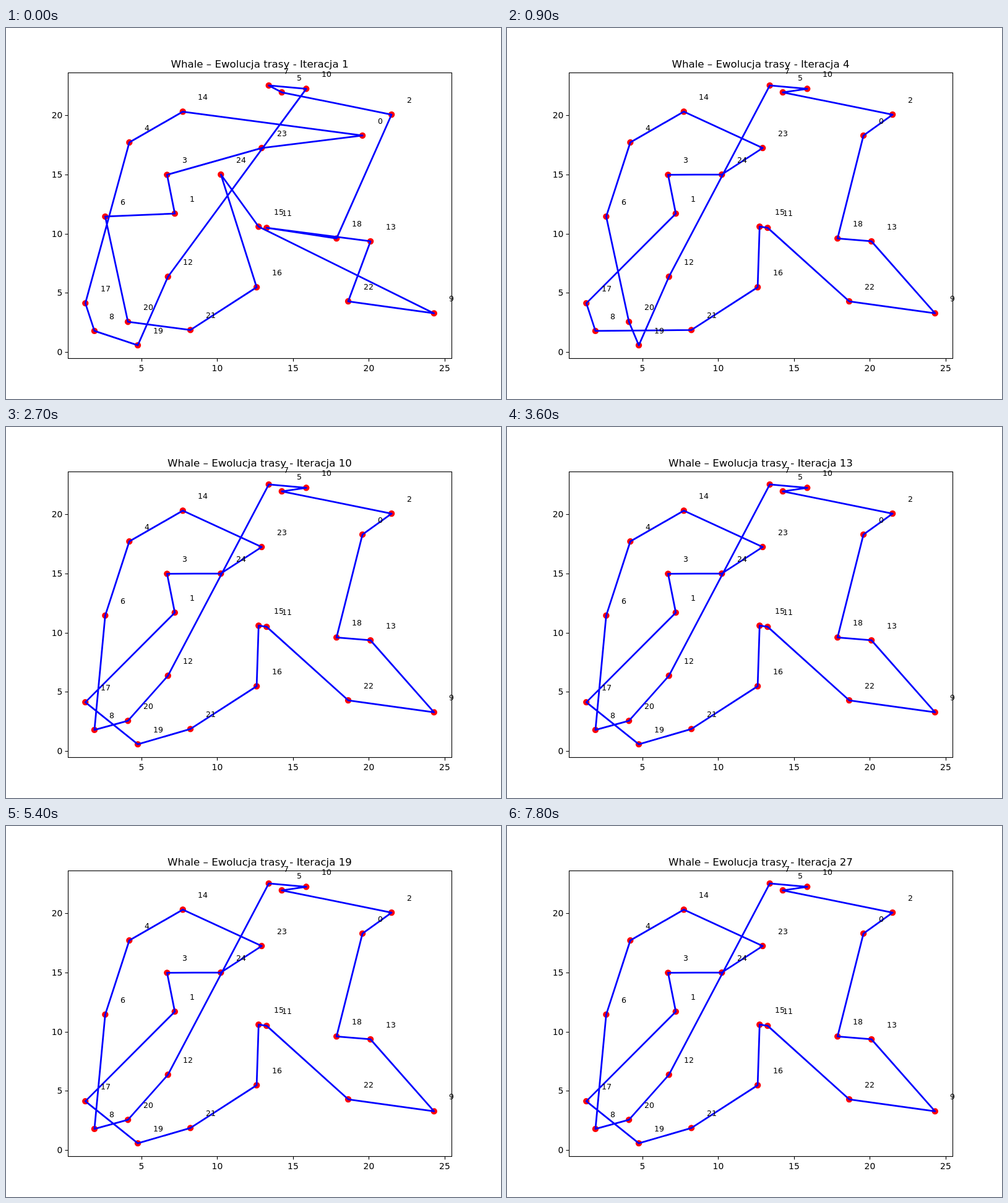
These frames come from a looping animation (800 by 600 pixels, 8000 ms). An HTML page:

```html
<!DOCTYPE html>
<html lang="pl">
<head>
<meta charset="utf-8">
<title>Ewolucja trasy</title>
<style>
  html, body { margin: 0; width: 100%; height: 100%; overflow: hidden; background: #fff; }
  svg { display: block; width: 800px; height: 600px; font-family: "DejaVu Sans", sans-serif; }
  .tick { font-size: 13.89px; }
  .label { font-size: 12.5px; }
  .title { font-size: 16.67px; text-anchor: middle; }
  .axis { fill: none; stroke: #000; stroke-width: 1.11; }
  .route { fill: none; stroke: #00f; stroke-width: 2.78; stroke-linejoin: round; }
  .city { fill: #f00; }
</style>
</head>
<body>
<svg id="chart" viewBox="0 0 800 600"></svg>
<script>
const STEP = 300, LOOP = 8000;

// City positions in chart units; the index is the label
const cities = `19.58,18.29 7.20,11.70 21.50,20.06 6.69,14.98 4.20,17.71
  14.26,21.94 2.61,11.45 13.40,22.52 1.90,1.79 24.30,3.28
  15.87,22.24 13.26,10.50 6.75,6.37 20.11,9.36 7.73,20.31
  12.73,10.60 12.60,5.48 1.30,4.13 17.87,9.60 4.76,0.58
  4.11,2.56 8.23,1.87 18.64,4.29 12.93,17.24 10.24,15.00`
  .split(/\s+/).map(pair => pair.split(',').map(Number));

const firstTour = '14 0 23 3 1 6 20 21 16 24 15 9 22 13 11 18 2 5 7 10 12 19 8 17 4'.split(' ');

// Each improvement takes a city out and puts it back behind another: "city>behind"
const improvements = {
  2: '0>18 24>14 11>16 22>15',
  3: '23>14 17>1 8>17 15>16 10>5 20>19 6>20',
  7: '19>17 8>20'
};

const px = x => 96.4 + x * 24.5;
const py = y => 524.2 - y * 19.15;
const snap = v => Math.round(v) + 0.5;

function improve(tour, moves) {
  for (const move of moves.split(' ')) {
    const [city, behind] = move.split('>');
    tour = tour.filter(c => c !== city);
    tour.splice(tour.indexOf(behind) + 1, 0, city);
  }
  return tour;
}

function tourAt(iteration) {
  let tour = firstTour;
  for (const step in improvements) {
    if (step <= iteration) tour = improve(tour, improvements[step]);
  }
  return tour;
}

const svg = document.getElementById('chart');

function add(tag, attrs, text = '') {
  const el = document.createElementNS('http://www.w3.org/2000/svg', tag);
  for (const key in attrs) el.setAttribute(key, attrs[key]);
  el.textContent = text;
  return svg.appendChild(el);
}

cities.forEach(([x, y]) => add('circle', { class: 'city', cx: px(x), cy: py(y), r: 5.2 }));

for (let v = 0; v <= 25; v += 5) {
  const x = snap(px(v)), y = snap(py(v));
  if (v > 0) {
    add('path', { class: 'axis', d: `M${x} 534.5v5` });
    add('text', { class: 'tick', x: px(v), y: 555, 'text-anchor': 'middle' }, v);
  }
  if (v < 25) {
    add('path', { class: 'axis', d: `M100.5 ${y}h-5` });
    add('text', { class: 'tick', x: 91.3, y: y + 4.5, 'text-anchor': 'end' }, v);
  }
}

const route = add('polygon', { class: 'route' });
add('rect', { class: 'axis', x: 100.5, y: 72.5, width: 620, height: 462 });

cities.forEach(([x, y], i) => add('text', {
  class: 'label', x: Math.round(px(x + 1)), y: Math.round(py(y + 1))
}, i));

const title = add('text', { class: 'title', x: 410, y: 64 });

let shown = 0;
function draw(time) {
  const iteration = Math.floor((time % LOOP) / STEP) + 1;
  if (iteration === shown) return;
  shown = iteration;
  title.textContent = `Whale – Ewolucja trasy - Iteracja ${iteration}`;
  route.setAttribute('points', tourAt(iteration)
    .map(i => `${px(cities[i][0])},${py(cities[i][1])}`).join(' '));
}

const start = performance.now();
function tick() {
  draw(performance.now() - start);
  requestAnimationFrame(tick);
}
tick();
</script>
</body>
</html>
```
